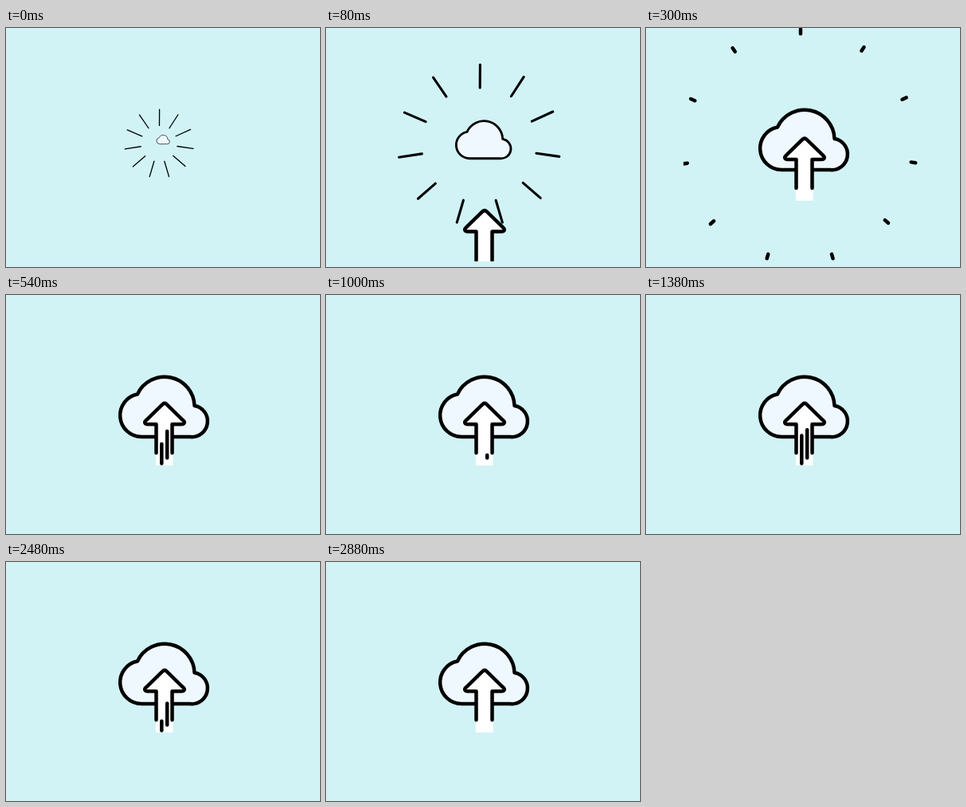
Recreate the animation shown at these times as an HTML page. Size 394x300 px, loop 3580 ms.

```html
<!DOCTYPE html>
<html lang="en">
<head>
<meta charset="utf-8">
<title>Cloud upload</title>
<style>
  html, body { margin: 0; width: 100%; height: 100%; overflow: hidden; background: #d1f3f5; }
  svg { display: block; width: 394px; height: 300px; }
  .ink { stroke: #000; stroke-width: 4.5; stroke-linecap: round; stroke-linejoin: round; }
</style>
</head>
<body>
<svg viewBox="0 0 394 300">
  <clipPath id="stage"><rect x="47" width="294" height="293"/></clipPath>
  <g clip-path="url(#stage)">
    <g id="rays" class="ink"></g>
    <path id="cloud" class="ink" fill="#f0f8ff"
      d="M170 178A27 27 0 0 1 165 124.5A37.5 37.5 0 0 1 236.5 139A19.7 19.7 0 0 1 231 178Z"/>
    <g id="arrow">
      <path fill="#fff" d="M188 160H209.6V214H188Z"/>
      <path class="ink" fill="#fff" d="M188.5 198.3V162.3H178C174 162.3 173 159.7 175.8 157.3L196.3 137.3Q199 134.6 201.7 137.3L222.2 157.3C225 159.7 224 162.3 220 162.3H208.5V198.3"/>
    </g>
    <g id="streaks" class="ink"></g>
  </g>
</svg>
<script>
const LOOP = 3580, STEP = 20;
const RAY_CENTER = [193, 148.3];
const RAY_TIPS = [
  [194, 1.6], [273.5, 24], [326.6, 87.4], [338.2, 169.2], [304, 244.8], [234.6, 289.3],
  [151.7, 289.3], [80.9, 246], [46.3, 170.5], [56.2, 89], [108.6, 25]
];
const STREAKS = [
  { x: 202.2, bottom: 204.6, top: 169.3, delay: 0 },
  { x: 195.3, bottom: 211.5, top: 176.5, delay: 100 }
];
// Start of growth and moment of disappearance for each burst of streaks
const BURSTS = [[304, 860], [984, 1540], [1664, 2220], [2324, 2880]];

const byId = id => document.getElementById(id);
const rays = byId('rays'), cloud = byId('cloud'), arrow = byId('arrow'), streaks = byId('streaks');

const remaining = (t, duration, power) =>
  Math.pow(1 - Math.min(1, Math.max(0, t / duration)), power);
const easeOut = (t, duration) => 1 - remaining(t, duration, 2);
const scaleAbout = (x, y, s) => `translate(${x} ${y}) scale(${s}) translate(${-x} ${-y})`;

function addLine(parent) {
  const line = document.createElementNS('http://www.w3.org/2000/svg', 'line');
  return parent.appendChild(line);
}

function setLine(line, x1, y1, x2, y2) {
  Object.entries({ x1, y1, x2, y2 }).forEach(([name, value]) => line.setAttribute(name, value));
}

const rayLines = RAY_TIPS.map(() => addLine(rays));
const streakLines = STREAKS.map(() => addLine(streaks));

function drawRays(t, growth) {
  const length = 77 * remaining(t + 20, 550, 3);
  rays.style.display = length > 0 ? '' : 'none';
  rays.setAttribute('transform', scaleAbout(192, 144, 0.17 + 0.83 * growth));
  RAY_TIPS.forEach(([x, y], i) => {
    const dx = RAY_CENTER[0] - x, dy = RAY_CENTER[1] - y;
    const k = length / Math.hypot(dx, dy);
    setLine(rayLines[i], x, y, x + dx * k, y + dy * k);
  });
}

function drawStreaks(t) {
  const burst = BURSTS.find(([start, end]) => t >= start && t < end);
  STREAKS.forEach(({ x, bottom, top, delay }, i) => {
    const age = burst ? t - burst[0] - delay : 0;
    streakLines[i].style.display = age > 0 ? '' : 'none';
    setLine(streakLines[i], x, bottom, x, bottom + (top - bottom) * easeOut(age, 300));
  });
}

function render(t) {
  const growth = easeOut(t + 20, 258);
  drawRays(t, growth);
  cloud.setAttribute('transform', scaleAbout(197, 140, growth));
  arrow.setAttribute('transform', `translate(0 ${183 * remaining(t, 397, 3)})`);
  drawStreaks(t);
}

const begin = performance.now();
function tick() {
  const t = (performance.now() - begin) % LOOP;
  render(Math.floor(t / STEP) * STEP);
  requestAnimationFrame(tick);
}
tick();
</script>
</body>
</html>
```
